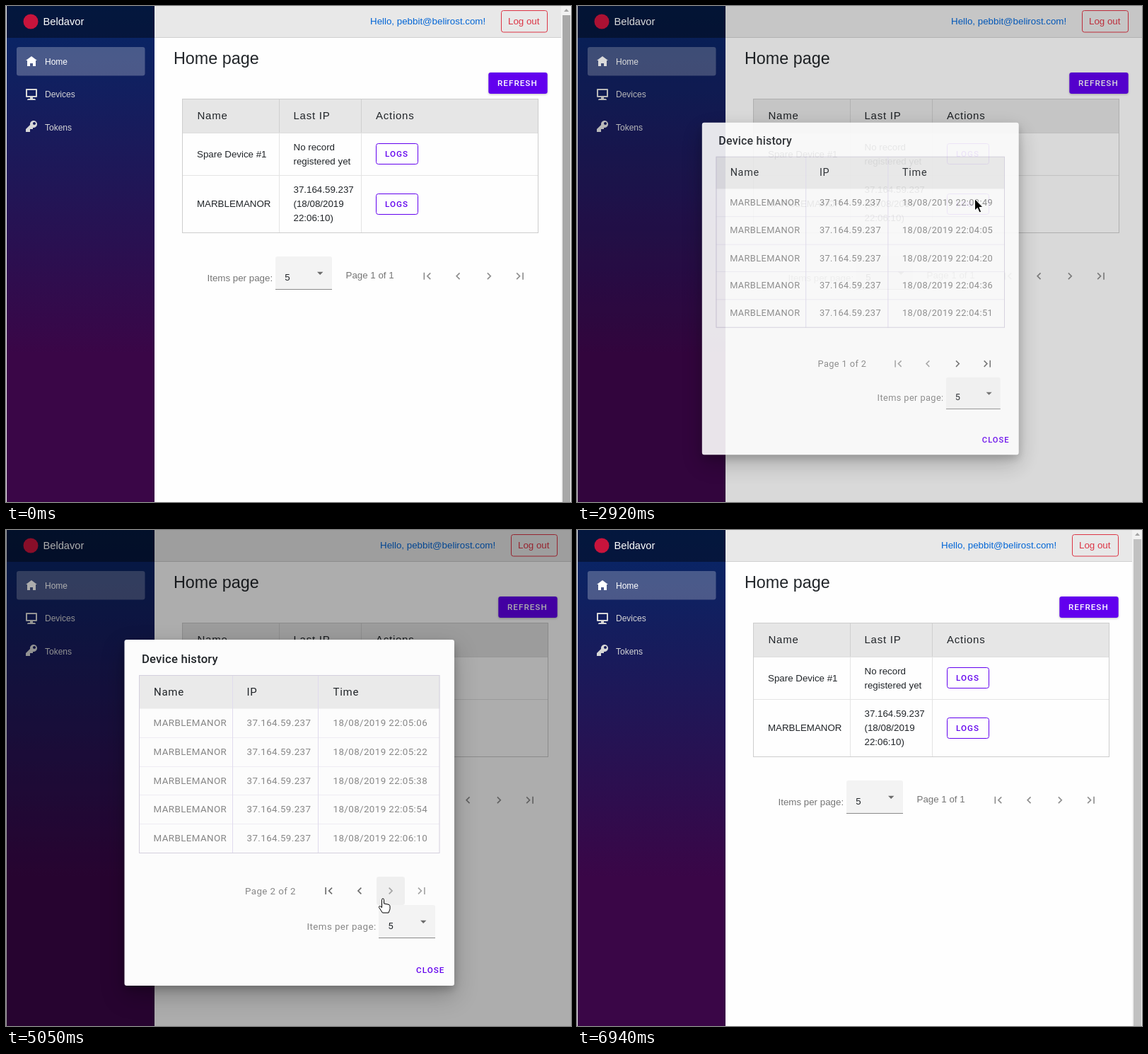
Animation of 799x701 px, one loop 7840 ms. Source, as an HTML page:

```html
<!DOCTYPE html>
<html lang="en">
<head>
<meta charset="utf-8">
<title>Device dashboard</title>
<style>
html, body { margin: 0; width: 100%; height: 100%; overflow: hidden; background: #fff; }
svg { display: block; width: 799px; height: 701px; }
text { font: 13.33px "Liberation Sans", Arial, sans-serif; fill: #212529; white-space: pre; }
.rb text, text.btn { font-family: Roboto, sans-serif; }
text.btn { font-size: 11.67px; font-weight: 500; letter-spacing: 1.04px; fill: #6200ee; }
text.head { font-size: 15px; letter-spacing: .75px; }
.rb text.cell { letter-spacing: .417px; fill: #878787; }
text.soft { fill: #757575; }
text.title { font-size: 16.67px; font-weight: 500; letter-spacing: .2px; }
text.nav { font-size: 12px; }
.raised { filter: drop-shadow(0 1.5px 1.5px rgba(0,0,0,.25)); }
.floating { filter: drop-shadow(0 5px 6px rgba(0,0,0,.2)) drop-shadow(0 13px 16px rgba(0,0,0,.24)); }
</style>
</head>
<body>
<svg id="stage" viewBox="0 0 799 701"></svg>
<script>
const LOOP = 7840, PURPLE = '#6200ee', DEVICE = 'MARBLEMANOR', IP = '37.164.59.237';
const OPEN = 2853, CLOSE = 6620;

const rect = (x, y, w, h, fill, extra = '') =>
  `<rect x="${x}" y="${y}" width="${w}" height="${h}" fill="${fill}" ${extra}/>`;
const text = (x, y, s, cls = '', extra = '') => `<text x="${x}" y="${y}" class="${cls}" ${extra}>${s}</text>`;
const line = (x1, y1, x2, y2, color) => `<path d="M${x1} ${y1}L${x2} ${y2}" stroke="${color}"/>`;
const outline = (x, y, w, h, color, rx = 3) => rect(x, y, w, h, 'none', `stroke="${color}" rx="${rx}"`);
const shape = (x, y, scale, d, fill) =>
  `<path transform="translate(${x} ${y}) scale(${scale})" d="${d}" fill="${fill}"/>`;

const ICON = {
  home: 'M4 0l-4 3h1v4h2v-2h2v2h2v-4.03l1 .03-4-3z',
  monitor: 'M.34 0a.5.5 0 0 0-.34.5v5a.5.5 0 0 0 .5.5h2.5v1h-1c-.55 0-1 .45-1 1h6c0-.55-.45-1-1-1h-1v-1h2.5a.5.5 0 0 0 .5-.5v-5a.5.5 0 0 0-.5-.5h-7.16zm.66 1h6v4h-6v-4z',
  key: 'M5.5 0c-1.38 0-2.5 1.12-2.5 2.5 0 .16 0 .32.03.47l-3.03 3.03v2h3v-2h2v-1l.03-.03c.15.03.31.03.47.03 1.38 0 2.5-1.12 2.5-2.5s-1.12-2.5-2.5-2.5zm.5 1c.55 0 1 .45 1 1s-.45 1-1 1-1-.45-1-1 .45-1 1-1z'
};
const CHEVRON = 'M3.41 -4.59L2 -6l-6 6 6 6 1.41-1.41L-1.17 0z';
const EDGE = 'M6.41 4.59L1.82 0l4.59-4.59L5 -6l-6 6 6 6zM-6 -6h2v12h-2z';

// First, previous, next and last page buttons
const pager = (x, y, back, forward) => [EDGE, CHEVRON, CHEVRON, EDGE].map((d, i) =>
  `<path transform="translate(${x + i * 43.8} ${y}) scale(${i < 2 ? .833 : -.833} .833)" d="${d}" fill="${i < 2 ? back : forward}"/>`).join('');

const select = (x, y, id = '') =>
  `<path ${id && `id="${id}Box"`} d="M${x} ${y + 47}v-44q0-3 3-3h74q3 0 3 3v44z" fill="#f3f3f3"/>` +
  line(x, y + 46.5, x + 80, y + 46.5, '#8a8a8a') +
  `<path ${id && `id="${id}Arrow"`} d="M${x + 59} ${y + 21.7}h8.4l-4.2 4.2z" fill="#6b6b6b"/>` +
  text(x + 13.3, y + 34, '5');

const logs = y => outline(523.5, y + .5, 59, 29, PURPLE) + text(536, y + 18.6, 'LOGS', 'btn');

function sidebar() {
  return rect(0, 0, 1, 701, '#ececec') + rect(1, 0, 209, 701, 'url(#side)') +
    rect(1, 0, 209, 45, '#000', 'opacity=".4"') +
    '<circle cx="35" cy="22" r="10.5" fill="#c8143c"/>' +
    text(52.5, 26.5, 'Beldavor', '', 'style="font-size:14.67px;fill:#fff"') +
    rect(15, 58, 181.5, 40.5, '#fff', 'opacity=".25" rx="3.3"') +
    shape(28, 71, 2, ICON.home, '#fff') + shape(28, 117, 2, ICON.monitor, '#d7d7d7') +
    shape(28, 162, 2, ICON.key, '#d7d7d7') +
    ['Home', 'Devices', 'Tokens'].map((s, i) =>
      text(55, 82.5 + i * 46.7, s, 'nav', `style="fill:${i ? '#d7d7d7' : '#fff'}"`)).join('');
}

// The content is wider by `dx` while the scrollbar is gone
function page(dx) {
  const right = 752.5 + dx;
  return rect(210, 0, 589, 44, '#e8e8e8') + line(210, 44.5, 799, 44.5, '#d0d0d0') +
    text(237, 82, 'Home page', '', 'style="font-size:23.33px"') +
    rect(249, 131, right - 249, 48, '#e6e6e6') +
    line(249, 179.5, right, 179.5, '#dedede') + line(249, 239.5, right, 239.5, '#e4e4e4') +
    [386.5, 502.5].map(x => line(x, 131, x, 179, '#d0d0d0') + line(x, 179, x, 321, '#e4e4e4')).join('') +
    outline(249.5, 131.5, right - 249.5, 189, '#cdcdcd', 0) +
    text(270.5, 160, 'Name', 'head') + text(406.5, 160, 'Last IP', 'head') + text(523, 160, 'Actions', 'head') +
    text(270, 213.5, 'Spare Device #1') + text(270, 284.3, DEVICE) +
    text(406.5, 203.5, 'No record') + text(406.5, 223.5, 'registered yet') +
    text(406.5, 264, IP) + text(406.5, 284, '(18/08/2019') + text(406.5, 304, '22:06:10)') +
    logs(194) + logs(265) +
    `<g transform="translate(${dx} 0)">` +
    text(515, 25.5, 'Hello, pebbit@belirost.com!', '', 'style="fill:#0366d6"') +
    outline(700.5, 6.5, 65, 30.5, '#dc3545') + text(710, 26, 'Log out', '', 'style="fill:#dc3545"') +
    rect(682.3, 94, 83.4, 30, PURPLE, 'rx="3.3" class="raised"') +
    text(695, 112.5, 'REFRESH', 'btn', 'style="fill:#fff"') +
    text(284.5, 388.5, 'Items per page:', 'soft') + select(381, 354) +
    text(480.5, 384.5, 'Page 1 of 1', 'soft') + pager(595.5, 381.7, '#8f8f8f', '#8f8f8f') + '</g>';
}

function dialog() {
  let rows = '';
  for (let i = 0; i < 5; i++) {
    const top = Math.round(252 + i * 40.8) + .5, base = top + 24.5;
    if (i) rows += line(188, top, 613, top, '#eeecf3');
    rows += text(208.5, base, DEVICE, 'cell') + text(340.5, base, IP, 'cell') +
      text(462.5, base, '', 'cell', 'data-time');
  }
  return rect(167.5, 155, 466.5, 489, '#fcfcfc', 'rx="3.3" class="floating"') +
    text(192, 188, 'Device history', 'title') +
    rect(188, 205, 425.5, 47.5, '#eaeaea') + rows +
    [320.5, 441.5].map(x => line(x, 205, x, 457, '#e0dbed')).join('') +
    outline(188.5, 205.5, 424.5, 251, '#d4d0de', 0) +
    text(209, 233.5, 'Name', 'head') + text(340.5, 233.5, 'IP', 'head') + text(462.5, 233.5, 'Time', 'head') +
    text(338, 514.5, '', 'cell', 'id="pageNo"') +
    rect(480, 490, 40, 40, '#000', 'id="prevHover" rx="3"') + rect(524, 490, 40, 40, '#000', 'id="nextHover" rx="3"') +
    `<g id="pageOne">${pager(456.3, 510, '#a5a5a5', '#6e6e6e')}</g><g id="pageTwo">${pager(456.3, 510, '#6e6e6e', '#a5a5a5')}</g>` +
    text(425.5, 564.5, 'Items per page:', 'cell') + select(527, 530, 'sel') +
    rect(527, 575, 80, 2, PURPLE, 'id="selLine"') +
    rect(573, 607, 54, 30, PURPLE, 'id="closeHover" rx="3.3"') + text(580, 626, 'CLOSE', 'btn');
}

const stage = document.getElementById('stage');
stage.innerHTML = `<defs><linearGradient id="side" x1="0" y1="0" x2="0" y2="1">
  <stop offset="0" stop-color="#052767"/><stop offset=".7" stop-color="#3a0647"/></linearGradient></defs>` +
  rect(0, 0, 799, 701, '#fefefe') + sidebar() +
  `<g id="narrow">${page(0)}${rect(785, 0, 14, 701, '#f1f1f1')}
    ${rect(787, 13, 11, 688, '#c1c1c1', 'id="thumb"')}<path d="M789 8h7l-3.5-4z" fill="#a3a3a3"/>
    ${rect(682, 94, 83.5, 30, '#fff', 'id="refreshHover" rx="3.3"')}
    ${rect(523, 265, 60, 30, PURPLE, 'id="logsHover" rx="3.3"')}</g>
  <g id="wide">${page(14)}</g>` +
  rect(0, 0, 799, 701, '#000', 'id="scrim"') + `<g id="dialog" class="rb">${dialog()}</g>
  <g id="cursor" stroke-linejoin="round">
    <path id="arrow" d="M.5 .5V17L4.3 13.4 7 19.8 9.7 18.7 7 12.4H12z" stroke="#fff"/>
    <path id="beam" d="M-3.5 -9h2.5q1 0 1 1v16q0 1-1 1h-2.5M3.5 -9h-2.5q-1 0-1 1M3.5 9h-2.5q-1 0-1-1" fill="none" stroke="#000" stroke-width="1.4"/>
    <path id="hand" d="M-1.5 1.5q0-1.5 1.5-1.5t1.5 1.5v5.5l6.5 1.3q2 .5 2 2.5v4l-2 5.2h-8.5l-5-7.5q-.6-1.6 1.2-2l2.8 2z" fill="#fff" stroke="#000"/>
  </g>`;

const el = id => document.getElementById(id);
const show = (id, on) => el(id).setAttribute('display', on ? 'inline' : 'none');
const alpha = (id, v) => el(id).setAttribute('opacity', v);
const ramp = (t, a, b) => Math.min(1, Math.max(0, (t - a) / (b - a)));
const pulse = (t, on, off, fade = 120) => ramp(t, on, on + fade) - ramp(t, off, off + fade);
const mix = (a, b, k) => `rgb(${a.map((v, i) => Math.round(v + (b[i] - v) * k))})`;

// Cursor path: time, x, y
const PATH = [
  [100, 795, 96], [370, 795, 96], [760, 782, 97], [880, 720, 112], [970, 648, 135], [1150, 731, 110],
  [1210, 731, 110], [1350, 683, 195], [1530, 620, 295], [1720, 540, 372], [1830, 511, 378], [1960, 518, 379],
  [2020, 518, 379], [2170, 486, 320], [2330, 510, 206], [2520, 556, 262], [2620, 562, 272], [2920, 562, 272],
  [3250, 553, 310], [3400, 553, 310], [3800, 520, 352], [4120, 464, 416], [4180, 457, 464], [4210, 457, 464],
  [4630, 533, 521], [5230, 533, 521], [5560, 497, 514], [5780, 497, 514], [6010, 631, 577], [6280, 598, 617],
  [6640, 598, 617], [6940, 800, 160]
];
function cursorAt(t) {
  const i = Math.max(1, PATH.findIndex(p => p[0] > t));
  const [t0, x0, y0] = PATH[i - 1], [t1, x1, y1] = PATH[i];
  const k = ramp(t, t0, t1);
  return [x0 + (x1 - x0) * k, y0 + (y1 - y0) * k];
}

const inside = (x, y, [l, t, r, b]) => x >= l && x <= r && y >= t && y <= b;
const PAGE_BUTTONS = [[682, 94, 766, 124], [523, 194, 583, 224], [523, 265, 583, 295]];
const DIALOG_BUTTONS = [[480, 490, 520, 530], [524, 490, 564, 530], [573, 607, 627, 637]];
const PAGE_TEXT = [481, 370, 548, 389];

const TIMES = [
  ['03:49', '04:05', '04:20', '04:36', '04:51'],
  ['05:06', '05:22', '05:38', '05:54', '06:10']
];
const timeCells = stage.querySelectorAll('[data-time]');
let shownPage = -1;
function setPage(n) {
  if (n === shownPage) return;
  shownPage = n;
  timeCells.forEach((c, i) => c.textContent = '18/08/2019 22:' + TIMES[n][i]);
  el('pageNo').textContent = `Page ${n + 1} of 2`;
  show('pageOne', n === 0);
  show('pageTwo', n === 1);
}

function drawCursor(t, modal) {
  const visible = t >= 100 && t < 6930;
  show('cursor', visible);
  if (!visible) return;
  const [x, y] = cursorAt(t);
  const hand = (modal ? DIALOG_BUTTONS : PAGE_BUTTONS).some(b => inside(x, y, b));
  const beam = !modal && inside(x, y, PAGE_TEXT);
  show('hand', hand);
  show('beam', beam);
  show('arrow', !hand && !beam);
  el('cursor').setAttribute('transform', `translate(${x.toFixed(1)} ${y.toFixed(1)})`);
}

function draw(t) {
  const modal = t >= OPEN && t < CLOSE + 75;
  show('narrow', !modal);
  show('wide', modal);
  show('dialog', modal);
  el('thumb').setAttribute('fill', mix([168, 168, 168], [193, 193, 193], ramp(t, 790, 900)));
  alpha('refreshHover', .1 * pulse(t, 830, 1240));
  alpha('logsHover', .05 * pulse(t, 2460, 2900) + .12 * pulse(t, 2790, 2900, 50));

  const leaving = 1 - ramp(t, CLOSE, CLOSE + 75);
  alpha('scrim', .32 * ramp(t, OPEN, OPEN + 150) * leaving);
  alpha('dialog', ramp(t, OPEN, OPEN + 75) * leaving);
  const scale = 1 - .2 * (1 - ramp(t, OPEN, OPEN + 150)) ** 2.67;
  el('dialog').setAttribute('transform',
    scale < 1 ? `translate(400.75 399.5) scale(${scale}) translate(-400.75 -399.5)` : '');

  setPage(t >= 4840 && t < 5740 ? 1 : 0);
  const focus = pulse(t, 3050, 4840, 180);
  el('selBox').setAttribute('fill', mix([243, 243, 243], [220, 220, 220], focus));
  el('selArrow').setAttribute('fill', mix([107, 107, 107], [98, 0, 238], focus));
  alpha('selLine', focus);
  alpha('nextHover', .012 * ramp(t, 4800, 4900) + .04 * pulse(t, 4800, 5300));
  alpha('prevHover', .05 * pulse(t, 5420, 5830));
  alpha('closeHover', .05 * pulse(t, 6150, 6700) + .1 * pulse(t, 6520, 6700, 80));
  drawCursor(t, t >= OPEN && t < CLOSE);
}

const start = performance.now();
function tick() {
  draw((performance.now() - start) % LOOP);
  requestAnimationFrame(tick);
}
tick();
</script>
</body>
</html>
```
